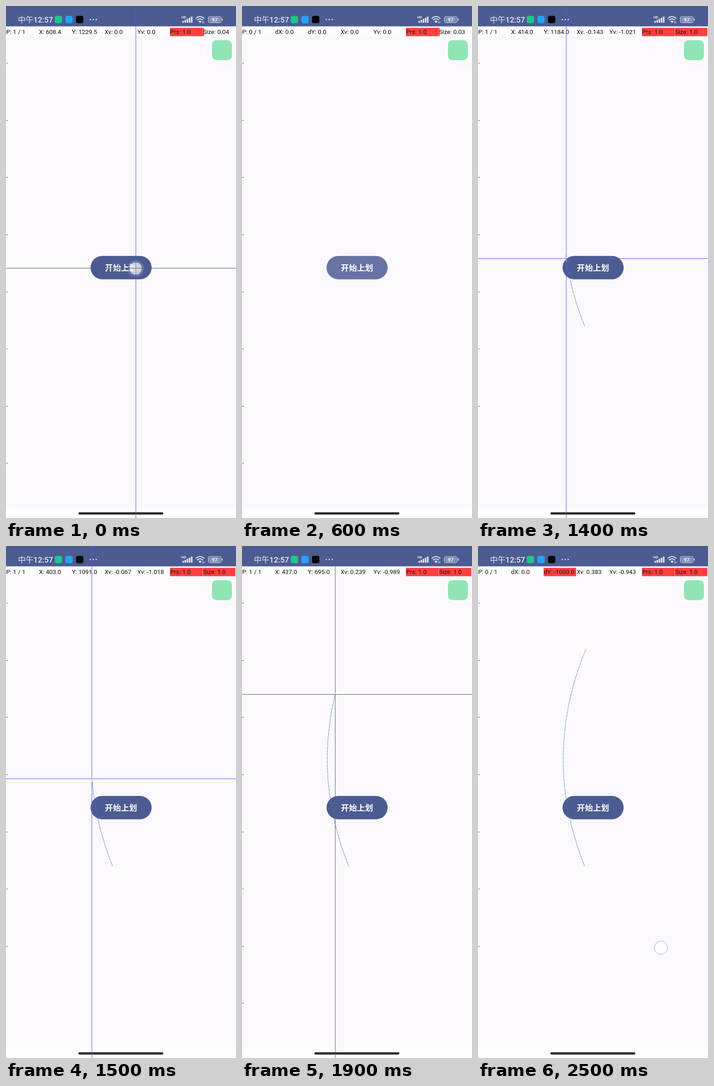
These frames come from a looping animation (502 by 1116 pixels, 2600 ms). An HTML page:

```html
<!DOCTYPE html>
<html lang="zh">
<head>
<meta charset="utf-8">
<title>Swipe gesture</title>
<style>
  html, body { margin: 0; width: 100%; height: 100%; overflow: hidden; background: #fbf9fd; }
  svg { display: block; width: 502px; height: 1116px; }
  text { font-family: Roboto, "Noto Sans CJK SC", "Noto Sans CJK", sans-serif; white-space: pre; }
</style>
</head>
<body>
<svg viewBox="0 0 502 1116" xmlns="http://www.w3.org/2000/svg">
  <defs>
    <linearGradient id="ink" gradientUnits="userSpaceOnUse" x1="0" y1="226" x2="0" y2="698">
      <stop offset="0" stop-color="#b0707c"/>
      <stop offset=".16" stop-color="#50709f"/>
      <stop offset=".5" stop-color="#2f90e8"/>
      <stop offset=".8" stop-color="#4570a8"/>
      <stop offset="1" stop-color="#56606f"/>
    </linearGradient>
  </defs>

  <rect width="502" height="1116" fill="#fbf9fd"/>
  <rect y="1095" width="502" height="21" fill="#fefefe"/>

  <!-- status bar -->
  <rect width="502" height="44.5" fill="#4c5c92"/>
  <g fill="#e9ebf4">
    <text x="26" y="35.8" font-size="16.9" font-weight="500">中午12:57</text>
    <circle cx="184" cy="29.5" r="1.4"/>
    <circle cx="190.5" cy="29.5" r="1.4"/>
    <circle cx="197" cy="29.5" r="1.4"/>
    <text x="383" y="27.3" font-size="7.4" font-weight="700">HD</text>
    <g id="bars"></g>
  </g>
  <rect x="106.3" y="21.5" width="16" height="16" rx="4" fill="#1fc48f"/>
  <rect x="129.5" y="21.5" width="16" height="16" rx="4" fill="#23a3f5"/>
  <rect x="152.8" y="21.5" width="16" height="16" rx="4" fill="#050508"/>
  <g fill="none" stroke="#e9ebf4" stroke-width="2">
    <path d="M414 27.3Q423.5 18.8 433 27.3M417 30.8Q423.5 25.2 430 30.8"/>
    <path d="M420 33.4Q423.5 30.2 427 33.4L423.5 37Z" fill="#e9ebf4" stroke="none"/>
    <path d="M429.3 33.5v4M432 33.5v4" stroke-width="1.2"/>
    <rect x="441.6" y="23" width="28" height="13.2" rx="4" stroke-width="1.2"/>
    <path d="M472.3 27.5v4" stroke-width="1.6"/>
  </g>
  <rect x="443.4" y="24.8" width="24.2" height="9.6" rx="2.4" fill="#8a95b8"/>
  <text x="455.6" y="33.5" font-size="11" font-weight="500" fill="#fff" text-anchor="middle">97</text>

  <!-- floating shortcut -->
  <path d="M502 66H470.5A30.5 30.5 0 0 0 470.5 127H502Z" fill="#fcfbfd" stroke="#f3f1f5"/>
  <rect x="449.5" y="74.5" width="43.5" height="43.5" rx="10" fill="#8fe5b5"/>

  <!-- button -->
  <rect id="button" x="184.5" y="544.7" width="133.4" height="51" rx="25.5"/>
  <text x="251" y="576.6" font-size="17.6" font-weight="700" fill="#fff" text-anchor="middle">开始上划</text>

  <rect x="158" y="1103.6" width="185.5" height="4.8" rx="2.4" fill="#2b2b2d"/>

  <g id="tap">
    <circle cx="283" cy="572" r="18" fill="#fff" opacity=".16"/>
    <circle cx="283" cy="572" r="13.3" fill="#f1f1f6" opacity=".72"/>
  </g>
  <circle id="ring" cx="399.3" cy="875.8" r="14.2" fill="#fff" fill-opacity=".6" stroke="#cfd0ec" stroke-width="2"/>

  <!-- pointer readout -->
  <rect y="44.5" width="502" height="21.5" fill="#fff" opacity=".55"/>
  <g id="ticks" fill="#58575c" shape-rendering="crispEdges"></g>
  <g id="cells" font-size="13.3" fill="#111"></g>
  <g id="cross" shape-rendering="crispEdges">
    <rect id="across" width="502" height="1"/>
    <rect id="down" width="1" height="1116"/>
  </g>
  <path id="trail" fill="none" stroke="url(#ink)" stroke-width=".8" opacity=".85"/>
  <path id="dots" fill="none" stroke="#26355c" stroke-linecap="round" stroke-dasharray=".01 7.75"/>
  <path id="speed" fill="none" stroke-width="1.2"/>
</svg>

<script>
const LOOP = 2600, STEP = 100, K = 502 / 1080, CELL = 154 * K;
const BLUE = "#5656e2", DARK = "#5c5c62";
const NS = "http://www.w3.org/2000/svg";
const $ = id => document.getElementById(id);

function set(el, attrs) {
  for (const name in attrs) el.setAttribute(name, attrs[name]);
}
function add(parent, tag, attrs) {
  const el = document.createElementNS(NS, tag);
  set(el, attrs);
  parent.appendChild(el);
  return el;
}
function show(el, on) {
  el.style.display = on ? "" : "none";
}

for (let i = 0; i < 5; i++) {
  const h = 4 + i * 2.4;
  add($("bars"), "rect", { x: 385 + i * 4.7, y: 36.6 - h, width: 3.2, height: h, rx: 1 });
}

const ticks = [];
for (let i = 1; i <= 8; i++) {
  ticks.push(add($("ticks"), "rect", { x: 0, y: Math.floor(i * 124.6), width: 4, height: 1 }));
}

const cells = [];
for (let i = 0; i < 7; i++) {
  const x = i * CELL;
  cells.push({
    bar: add($("cells"), "rect", { x, y: 47.5, height: 18.3, fill: "#ff4040" }),
    label: add($("cells"), "text", { x: x + K, y: 61.4 })
  });
}

// time, progress, x speed, y speed
const KEYS = [
  [1200, .093, -.319, -.989],
  [1400, .316, -.143, -1.021],
  [1700, .594, .085, -1.011],
  [1900, .805, .239, -.989],
  [2100, 1, .383, -.943]
];

function swipe(t) {
  let i = 0;
  while (i < KEYS.length - 2 && t > KEYS[i + 1][0]) i++;
  const a = KEYS[i], b = KEYS[i + 1];
  const f = Math.min(1, (t - a[0]) / (b[0] - a[0]));
  const [p, vx, vy] = [1, 2, 3].map(n => a[n] + (b[n] - a[n]) * f);
  return { p, vx, vy };
}

const curve = p => ({ x: 500 - 400 * p * (1 - p), y: 1500 - 1000 * p });

// The swipe is a quadratic curve through (500,1500), (300,1000), (500,500).
function trailPath(p) {
  const a = curve(0), e = curve(p);
  const cx = 500 - 200 * p, cy = 1500 - 500 * p;
  return `M${a.x * K} ${a.y * K}Q${cx * K} ${cy * K} ${e.x * K} ${e.y * K}`;
}

function readout(texts, fills) {
  cells.forEach((c, i) => {
    c.label.textContent = texts[i];
    c.bar.setAttribute("width", (CELL - K) * fills[i]);
  });
}

function draw(ms) {
  const t = Math.floor(ms / STEP) * STEP;
  const tapping = t < 100, swiping = t >= 1200 && t < 2200, swiped = t >= 1200;
  const down = tapping || swiping;

  $("button").setAttribute("fill",
    t < 200 || swiped ? "#4c5c92" : t < 300 ? "#59689a" : "#6673a3");

  show($("tap"), t < 200);
  $("tap").setAttribute("opacity", tapping ? 1 : .4);
  show($("ring"), t >= 2400);
  $("ring").setAttribute("opacity", t < 2500 ? .5 : 1);
  show(ticks[7], !(t >= 1400 && t < 1800) && t < 2400);

  const s = swiped ? swipe(t) : { p: 0, vx: 0, vy: 0 };
  let at = { x: 608.4, y: 1229.5 };
  if (swiped) {
    const c = curve(s.p);
    at = { x: Math.round(c.x), y: Math.round(c.y) };
  }

  show($("cross"), down);
  set($("across"), { y: Math.round(at.y * K), fill: t >= 1400 && t < 1800 ? BLUE : DARK });
  set($("down"), { x: Math.round(at.x * K), fill: t < 1800 ? BLUE : DARK });

  for (const id of ["trail", "dots", "speed"]) show($(id), swiped);
  if (swiped) {
    const d = trailPath(s.p), x = at.x * K, y = at.y * K;
    const dx = s.vx * 16 * K, dy = s.vy * 16 * K;
    $("trail").setAttribute("d", d);
    $("dots").setAttribute("d", d);
    set($("speed"), swiping
      ? { d: `M${x - dx} ${y - dy}L${x + dx} ${y + dy}`, stroke: "#d9c24a" }
      : { d: `M${x} ${y}L${x + dx} ${y + dy}`, stroke: "#e08a90" });
  }

  const speed = v => swiped ? String(+v.toFixed(3)) : "0.0";
  const size = swiped ? 1 : tapping ? .04 : .03;
  readout([
    down ? "P: 1 / 1" : "P: 0 / 1",
    down ? "X: " + at.x.toFixed(1) : "dX: 0.0",
    down ? "Y: " + at.y.toFixed(1) : swiped ? "dY: -1000.0" : "dY: 0.0",
    "Xv: " + speed(s.vx),
    "Yv: " + speed(s.vy),
    "Prs: 1.0",
    "Size: " + (swiped ? "1.0" : size)
  ], [0, 0, swiped && !down ? 1 : 0, 0, 0, 1, size]);
}

const start = performance.now();
function tick() {
  draw((performance.now() - start) % LOOP);
  requestAnimationFrame(tick);
}
tick();
</script>
</body>
</html>
```
